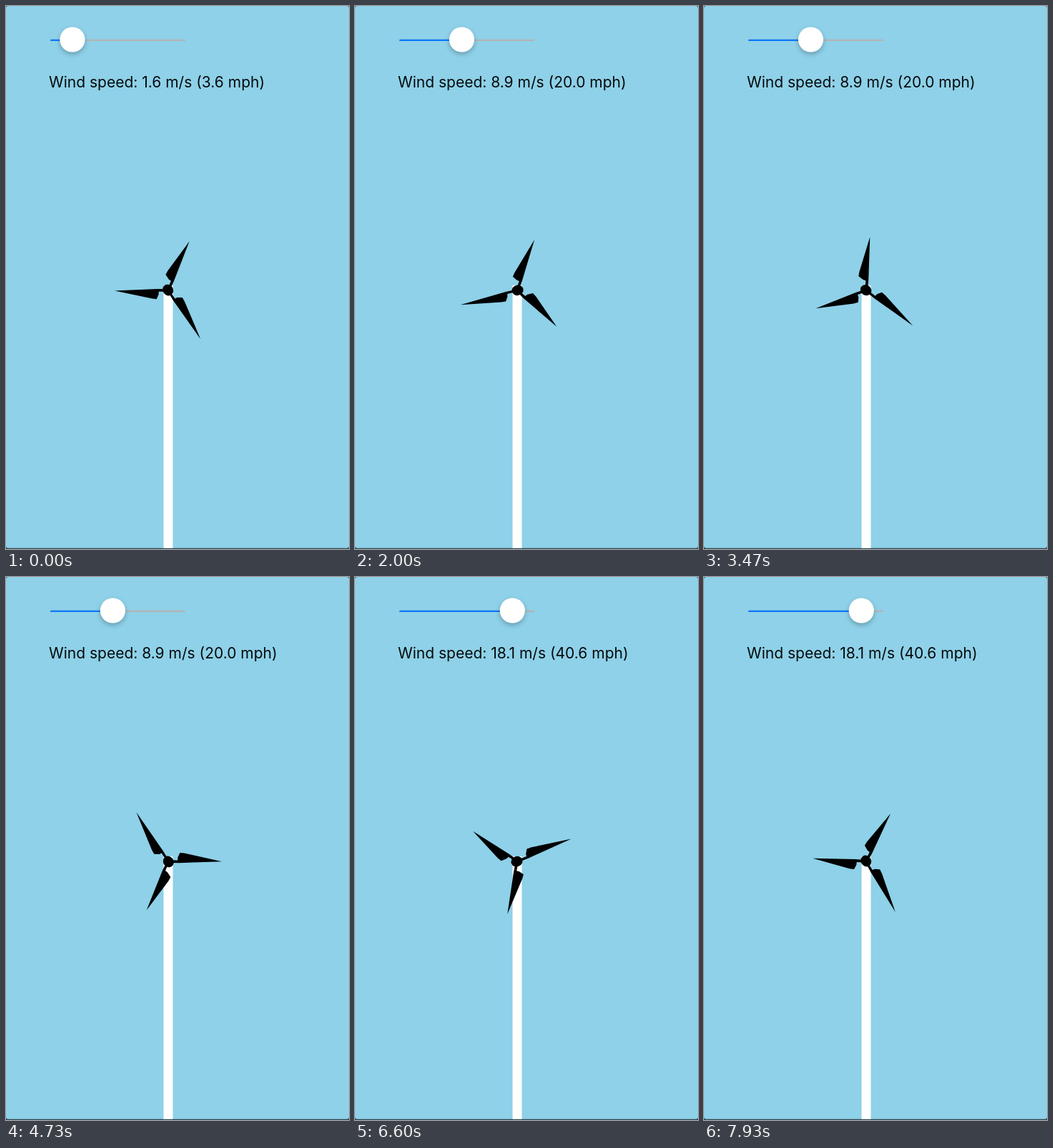
Write an HTML page that moves like this. It is 480 by 760 pixels and loops after 8 s.

```html
<!DOCTYPE html>
<html lang="en">
<head>
<meta charset="utf-8">
<title>Wind turbine</title>
<style>
  html, body { margin: 0; height: 100%; overflow: hidden; background: #34464e; }
  svg { display: block; width: 480px; height: 760px; }
  text { font: 21px Inter, sans-serif; fill: #060a0c; white-space: pre; }
  #thumb { filter: drop-shadow(0 3px 3px rgba(0, 0, 0, .25)); }
</style>
</head>
<body>
<svg viewBox="0 0 480 760">
  <defs>
    <path id="blade" d="M0-72.5 L2-14 L1.5 0 H-1.5 V-13 L-5-13.5 L-11-17 L-10.5-23Z"/>
  </defs>
  <rect width="480" height="758.7" rx="3" fill="#8ed1e8"/>

  <rect x="62" y="46.7" width="189" height="2.4" rx="1.2" fill="#b4b3b6"/>
  <rect id="fill" x="62" y="46.7" height="2.4" rx="1.2" fill="#0b79fb"/>
  <circle id="thumb" cy="47" r="17.6" fill="#fff"/>
  <text id="label" x="60" y="114"></text>

  <rect x="220.5" y="391" width="13" height="367.7" fill="#fff"/>
  <g id="rotor">
    <!-- The rotor is slightly taller than wide, so one blade is longer. -->
    <g transform="scale(1 1.13)">
      <use href="#blade"/>
      <use href="#blade" transform="rotate(120)"/>
      <use href="#blade" transform="rotate(240)"/>
      <circle cy=".5" r="7.2"/>
    </g>
  </g>
</svg>
<script>
  const DURATION = 8, FPS = 15;   // seconds, pictures per second
  const DRAG_TIME = 0.6;
  const MPH = 2.237;

  // Wind in m/s, spin in degrees per second; each drag adds to both.
  const start = { wind: 1.6, spin: 28.4, angle: 146.5 };
  const drags = [
    { at: 1.295, wind: 7.34, spin: 129.4 },
    { at: 5.348, wind: 9.2, spin: 174.2 },
  ];

  const el = id => document.getElementById(id);

  const smoothstep = u => u * u * (3 - 2 * u);
  const smoothstepArea = u => u ** 3 - u ** 4 / 2;

  function stateAt(time) {
    let wind = start.wind;
    let angle = start.angle + start.spin * time;
    for (const drag of drags) {
      const progress = Math.max(0, (time - drag.at) / DRAG_TIME);
      const u = Math.min(1, progress);
      wind += drag.wind * smoothstep(u);
      angle += drag.spin * DRAG_TIME * (smoothstepArea(u) + progress - u);
    }
    return { wind, angle };
  }

  function draw(time) {
    const { wind, angle } = stateAt(time);
    const x = 80.6 + 7.7 * wind;
    el('thumb').setAttribute('cx', x);
    el('fill').setAttribute('width', x - 62);
    el('label').textContent =
      `Wind speed: ${wind.toFixed(1)} m/s (${(wind * MPH).toFixed(1)} mph)`;
    el('rotor').setAttribute('transform', `translate(227 398) rotate(${angle})`);
  }

  function frame() {
    // Small lead, because picture times are rounded to 10 ms.
    const time = performance.now() / 1000 % DURATION + 0.004;
    draw(Math.floor(time * FPS) / FPS % DURATION);
    requestAnimationFrame(frame);
  }
  frame();
</script>
</body>
</html>
```
